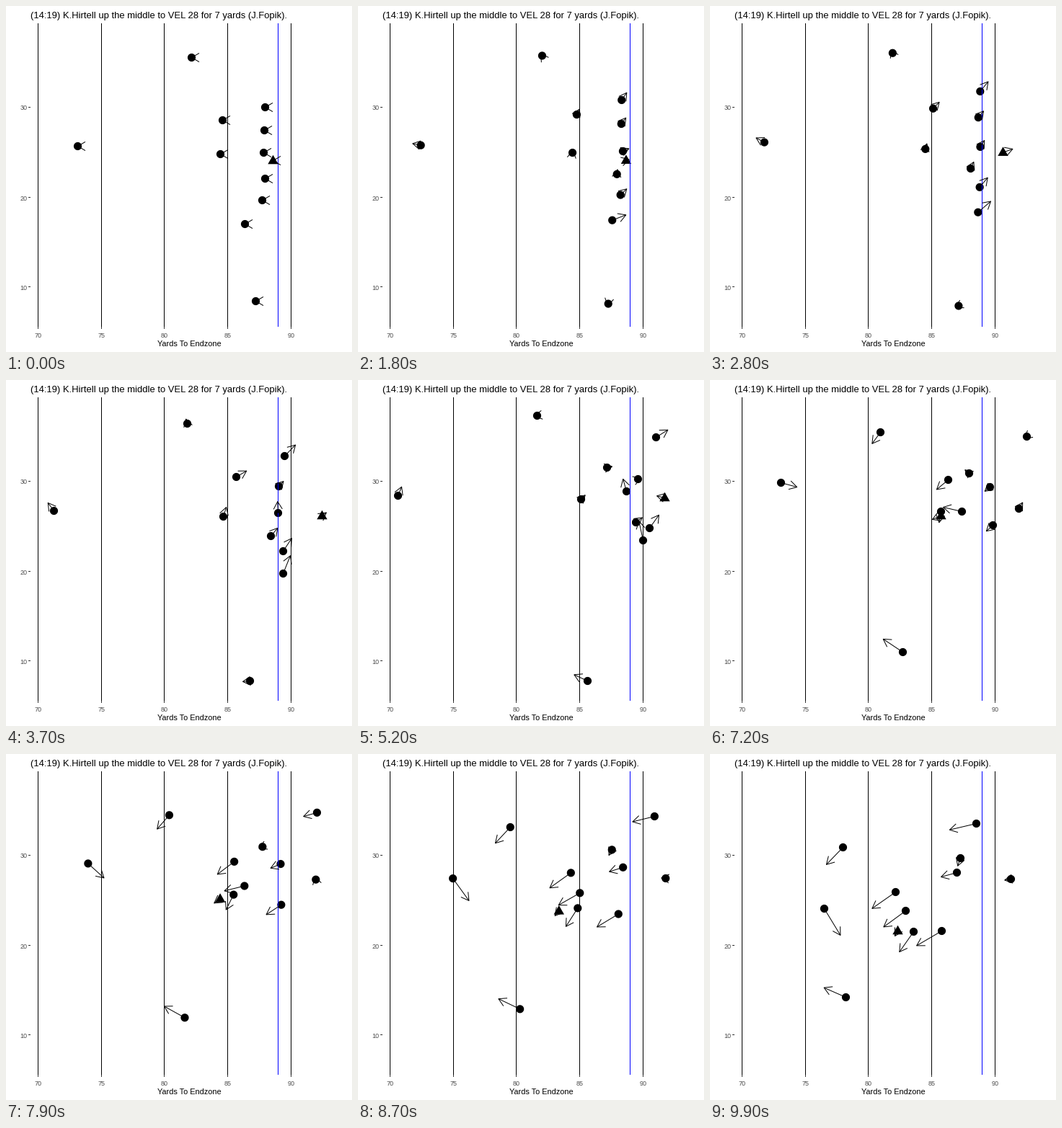
A matplotlib script that plays this animation: 480 by 480 pixels, repeating every 10000 ms.

```python
import numpy as np
import matplotlib.pyplot as plt
from matplotlib.animation import FuncAnimation
from matplotlib.collections import LineCollection, PolyCollection

FRAMES, STEP = 100, 100
SIZE = 480
HEAD = 10.5       # arrow head, tip to base
BALL_ARROW = 0.3  # the ball shows only part of its speed

clock = np.arange(FRAMES) * STEP / 1000


def glide(keys, points):
    """Smooth path through points: at rest first, no bend at the end."""
    keys, pos = np.array(keys), np.array(points, float)
    slope = np.gradient(pos, keys, axis=0)
    slope[-1] = 1.5 * slope[-1] - 0.5 * slope[-2]
    slope[0] = 0
    i = np.clip(np.searchsorted(keys, clock, side="right") - 1, 0, len(keys) - 2)
    h = (keys[i + 1] - keys[i])[:, None]
    s = np.clip((clock - keys[i])[:, None] / h, 0, 1)
    ease = s * s * (3 - 2 * s)
    return (pos[i] + (pos[i + 1] - pos[i]) * ease
            + h * s * (1 - s) * ((1 - s) * slope[i] - s * slope[i + 1]))


# each route: lined up, snap, handoff, tackle attempt, end of the run
RUN = (0, 3.7, 5.2, 7.2, 9.9)
routes = [
    # deep backs
    [(99, 194), (66, 181), (55, 160), (98, 142), (158, 214)],
    [(257, 71), (251, 60), (248, 49), (236, 72), (184, 129)],
    [(346, 409), (338, 417), (318, 417), (267, 377), (188, 337)],
    # linebackers
    [(300, 158), (319, 134), (345, 121), (330, 138), (257, 191)],
    [(297, 205), (301, 189), (309, 165), (320, 182), (282, 246)],
    [(331, 302), (384, 268), (395, 222), (349, 182), (271, 217)],
    # front line
    [(359, 140), (386, 105), (413, 79), (439, 78), (369, 96)],
    [(358, 172), (378, 147), (388, 137), (388, 148), (342, 164)],
    [(357, 203), (377, 184), (372, 154), (359, 129), (347, 144)],
    [(359, 239), (367, 216), (385, 197), (392, 201), (321, 245)],
    [(355, 269), (384, 237), (404, 205), (428, 178), (417, 173)],
]
ball = glide((1.6, 3.7, 4.4, 5.2, 7.2, 9.9),
             [(370, 214), (438, 188), (447, 177), (425, 163), (320, 188), (260, 245)])

places = np.stack([glide(RUN, r) for r in routes] + [ball], axis=1)
arrows = np.gradient(places, clock, axis=0)
arrows[:, -1] *= BALL_ARROW
arrows[0] = 0  # nobody has moved yet

turn = np.linspace(0, 2 * np.pi, 32, endpoint=False)
DOT = 5.6 * np.column_stack([np.cos(turn), np.sin(turn)])
WEDGE = np.array([(0, -7.8), (7.2, 4.8), (-7.2, 4.8)])
outlines = [DOT] * len(routes) + [WEDGE]


def arrow_lines(start, vec):
    """Shaft and open 60 degree head; a still arrow points left."""
    length = np.hypot(*vec)
    ux, uy = vec / length if length > 1e-6 else (-1.0, 0.0)
    tip = start + vec
    base = tip - HEAD * np.array([ux, uy])
    side = HEAD * np.tan(np.pi / 6) * np.array([-uy, ux])
    return [np.array([start, tip]), np.array([base + side, tip, base - side])]


plt.rcParams["font.family"] = "Liberation Sans"
fig = plt.figure(figsize=(SIZE / 72, SIZE / 72), dpi=72, facecolor="white")
ax = fig.add_axes([0, 0, 1, 1])
ax.set_xlim(-.5, SIZE - .5)  # whole numbers are pixel centres
ax.set_ylim(SIZE - .5, -.5)
ax.axis("off")


def rule(xs, ys, color="black"):
    ax.plot(xs, ys, color=color, lw=1, snap=False, solid_capstyle="butt")


def label(x, y, text, size, color="black", ha="center"):
    ax.text(x, y, text, size=size, color=color, ha=ha, va="baseline")


# field lines and axes
for yard in range(70, 91, 5):
    x = round(44 + (yard - 70) * 17.54)
    rule([x, x], [23.5, 444.5])
    rule([x, x], [444.5, 447.5], "#333333")
    label(x, 459, str(yard), 9, "#4d4d4d")
rule([377, 377], [23.5, 444.5], "blue")
for yard in (10, 20, 30):
    y = round(514 - 12.46 * yard)
    rule([30.5, 33.5], [y, y], "#333333")
    label(29, y + 4, str(yard), 9, "#4d4d4d", "right")
label(254, 472, "Yards To Endzone", 11)
label(33.5, 17, "(14:19) K.Hirtell up the middle to VEL 28 for 7 yards (J.Fopik).",
      13, ha="left")

marks = ax.add_collection(PolyCollection([], facecolors="black", linewidths=0))
lines = ax.add_collection(LineCollection([], colors="black", linewidths=1))


def draw(i):
    marks.set_verts([p + shape for p, shape in zip(places[i], outlines)])
    lines.set_segments([seg for p, v in zip(places[i], arrows[i])
                        for seg in arrow_lines(p, v)])
    return marks, lines


anim = FuncAnimation(fig, draw, frames=FRAMES, interval=STEP, repeat=True)
plt.show()
```
